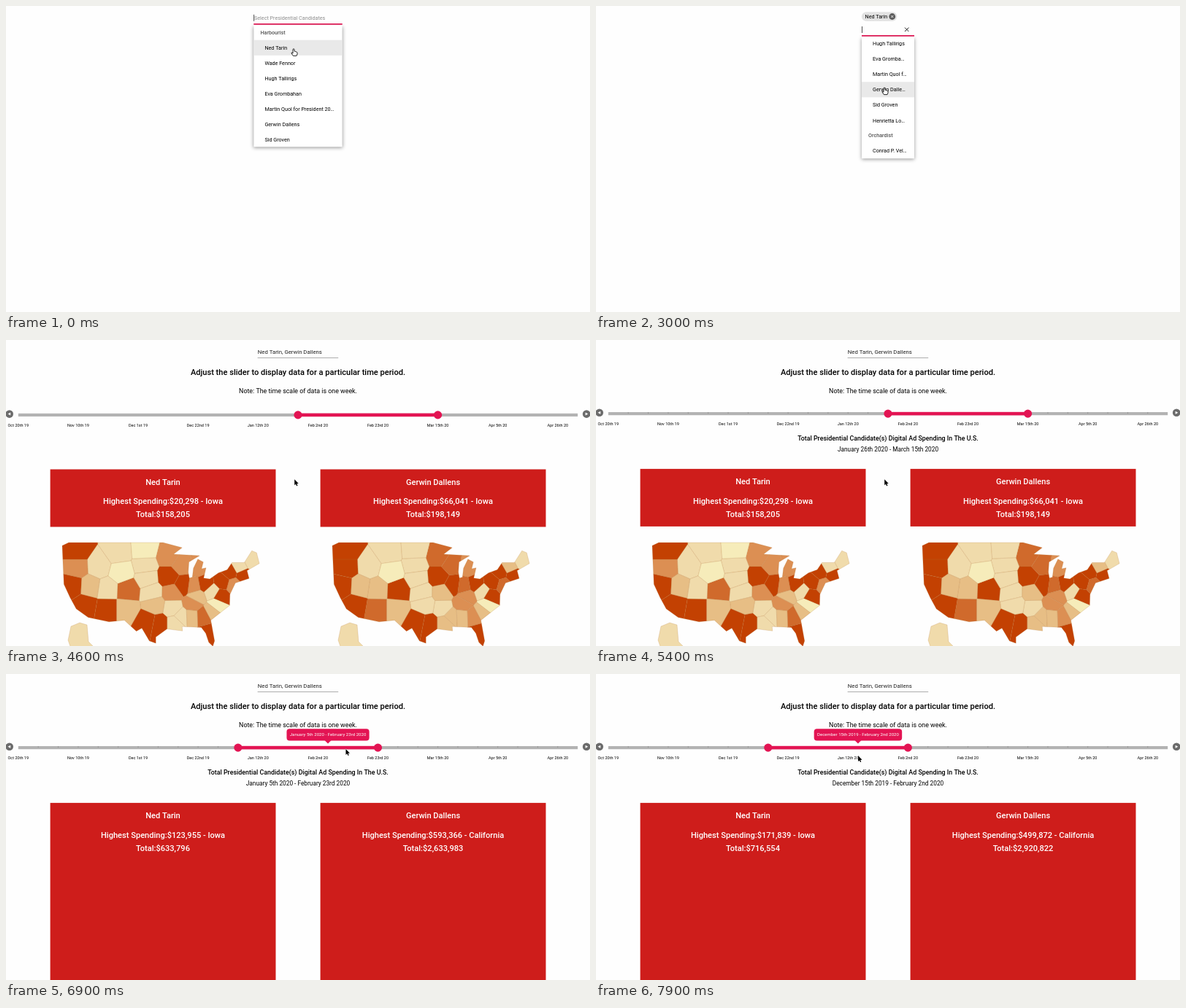
An HTML page with a canvas for the animation above (8 s loop, 800 by 420 pixels).

```html
<!DOCTYPE html>
<html lang="en">
<head>
<meta charset="utf-8">
<title>Campaign ad spending</title>
<style>
html, body { margin: 0; width: 100%; height: 100%; overflow: hidden; background: #fefefe; }
canvas { display: block; width: 800px; height: 420px; }
</style>
</head>
<body>
<canvas id="stage"></canvas>
<script>
const LOOP = 8000, W = 800, H = 420, STEP = 100;
const PINK = '#e31453', RED = '#ce1d1b', PAPER = '#fefefe';
const TINTS = ['#f6ecba', '#f0dbab', '#e7be85', '#dc8f53', '#d06a2c', '#c34102'];
const FIRST = 'Ned Tarin', SECOND = 'Gerwin Dallens';

const canvas = document.getElementById('stage');
const ctx = canvas.getContext('2d');
const dpr = window.devicePixelRatio || 1;
canvas.width = W * dpr;
canvas.height = H * dpr;

// Menu entries; groups start with '#'.
const MENU = ['#Harbourist', FIRST, 'Wade Fennor', 'Hugh Tallirigs', 'Eva Grombahan',
  'Martin Quol for President 2020', SECOND, 'Sid Groven', 'Henrietta Lowmarsh',
  '#Orchardist', 'Conrad P. Velling'];

const clamp = v => Math.max(0, Math.min(1, v));
const ramp = (t, a, b) => clamp((t - a) / (b - a));
const mix = (a, b, u) => a + (b - a) * u;
const ease = u => u * u * (3 - 2 * u);

function along(keys, t) {
  let i = keys.findIndex(k => k[0] > t);
  if (i < 0) return keys[keys.length - 1].slice(1);
  i = Math.max(i, 1);
  const a = keys[i - 1], b = keys[i], u = ramp(t, a[0], b[0]);
  return a.slice(1).map((v, n) => mix(v, b[n + 1], u));
}

const pairs = list => list.flatMap((v, i) => i % 2 ? [] : [[v, list[i + 1]]]);
function poly(points) {
  const p = new Path2D();
  for (const [x, y] of points) p.lineTo(x, y);
  p.closePath();
  return p;
}

// Mercator projection of longitude and latitude
const stretch = lat => Math.log(Math.tan(Math.PI / 4 + lat * Math.PI / 360));
const project = ([lon, lat]) => [77 + (lon + 124.7) * 4.68, 278 + (stretch(49) - stretch(lat)) * 268];

const COAST = [-124.7,48.4, -122.8,49, -95.2,49, -89.6,48, -92.1,46.7, -84.5,46.4, -87.6,45.1,
  -87.8,43, -87.5,41.7, -86.6,41.9, -86.3,43.8, -85,45.7, -83.4,45.1, -83.9,43.7, -82.6,43.9,
  -83.3,41.7, -81.5,41.5, -79,42.8, -76.4,43.5, -75,45, -71.4,45, -69.2,47.4, -67.8,47, -67,44.8,
  -70.6,43.3, -70,41.6, -74,40.6, -75.6,38, -75.7,35.4, -77.9,34, -81.2,31.8, -80.1,26.5,
  -80.6,25.1, -81.8,26.1, -82.7,28.5, -84,30, -89.6,30.2, -89.5,29.1, -94,29.6, -97.3,27.5,
  -97.3,25.9, -99.2,26.5, -101.4,29.8, -103,29, -106.5,31.8, -111,31.4, -117.1,32.5, -120.6,34.6,
  -122.4,37.3, -124.2,40.3];

// State centres, keyed by their tint on the left and the right map.
const CENTRES = {
  55: [-120.5,47.3, -121.7,40, -118,35.5, -99.5,31.5, -96.5,31, -93.5,42, -89.2,40.2, -82.8,40.4,
    -78.3,37.5, -77.8,40.9, -75.5,42.9, -82,28.4, -71.8,42.3],
  45: [-105.5,39], 54: [-111.6,34.6], 35: [-120.5,44], 43: [-83.4,32.8],
  34: [-93.5,46.2, -89.8,44.5, -86.2,39.9, -74.4,40.2],
  33: [-84.8,44, -86.4,35.8], 32: [-92.5,38.4], 23: [-85.3,37.5],
  22: [-116.6,39.8, -106,34.6, -86.8,32.7, -80.9,33.9],
  21: [-97.5,35.5],
  12: [-111.5,39.2, -91.5,31, -89.7,32.6, -72.8,44],
  11: [-114,44.2, -108.3,47, -100.3,44.4, -99.8,41.6, -98.4,38.5, -92.4,34.8, -80.8,38.7, -69.2,45.3],
  '01': [-100.5,47.4], '00': [-107.5,43, -79.3,35.6]
};

// Keeps the part of a shape that lies nearer to a than to b.
function nearer(shape, a, b) {
  const side = p => Math.hypot(p[0] - b[0], p[1] - b[1]) ** 2 - Math.hypot(p[0] - a[0], p[1] - a[1]) ** 2;
  return shape.flatMap((p, i) => {
    const q = shape[(i + 1) % shape.length], sp = side(p), sq = side(q), out = sp >= 0 ? [p] : [];
    if (sp * sq < 0) out.push(p.map((v, n) => mix(v, q[n], sp / (sp - sq))));
    return out;
  });
}

const land = poly(pairs(COAST).map(project));
const alaska = poly(pairs([85,412, 89,393, 101,388, 111,391, 113,414, 124,425, 92,432]));
const sites = Object.entries(CENTRES).flatMap(([tints, list]) =>
  pairs(list).map(p => ({ tints, at: project(p) })));
const frame = [[60, 260], [360, 260], [360, 440], [60, 440]];
for (const s of sites)
  s.path = poly(sites.reduce((shape, o) => o === s ? shape : nearer(shape, s.at, o.at), frame));

function rect(x, y, w, h, fill) {
  ctx.fillStyle = fill;
  ctx.fillRect(x, y, w, h);
}
function pill(x, y, w, h, r, fill) {
  ctx.fillStyle = fill;
  ctx.beginPath();
  ctx.roundRect(x, y, w, h, r);
  ctx.fill();
}
function disc(x, y, r, fill) {
  ctx.fillStyle = fill;
  ctx.beginPath();
  ctx.arc(x, y, r, 0, 7);
  ctx.fill();
}
function cross(x, y, r, color) {
  ctx.strokeStyle = color;
  ctx.lineWidth = 1;
  ctx.beginPath();
  ctx.moveTo(x - r, y - r); ctx.lineTo(x + r, y + r);
  ctx.moveTo(x + r, y - r); ctx.lineTo(x - r, y + r);
  ctx.stroke();
}
const setFont = (size, weight = 400) => { ctx.font = `${weight} ${size}px Roboto, sans-serif`; };

// y is the middle of the capitals
function label(str, x, y, size, color = '#000', weight = 400, align = 'left') {
  setFont(size, weight);
  ctx.fillStyle = color;
  ctx.textAlign = align;
  ctx.fillText(str, x, y + size * 0.355);
}
const centred = (str, x, y, size, color, weight) => label(str, x, y, size, color, weight, 'center');

function shorten(str, max) {
  if (ctx.measureText(str).width <= max) return str;
  while (ctx.measureText(str + '…').width > max) str = str.slice(0, -1);
  return str.trimEnd() + '…';
}

function chip(x, name) {
  setFont(7.2);
  const w = ctx.measureText(name).width + 17.5;
  pill(x, 8.3, w, 12.4, 6.2, '#e2e2e2');
  label(name, x + 4.5, 14.6, 7.2);
  disc(x + w - 6.5, 14.5, 4.4, '#5c5c5c');
  cross(x + w - 6.5, 14.5, 1.6, '#e8e8e8');
  return x + w + 3.5;
}

function caret(x, y, t) {
  if ((t + 400) % 1000 < 500) rect(x, y, 0.8, 9, '#222');
}

function menu(x, y, w, scroll, hover, thumb) {
  const h = 167.3;
  ctx.save();
  ctx.shadowColor = 'rgba(0,0,0,.42)';
  ctx.shadowBlur = 5 * dpr;
  ctx.shadowOffsetY = 2 * dpr;
  rect(x, y, w, h, '#fff');
  ctx.restore();
  ctx.save();
  ctx.beginPath();
  ctx.rect(x, y, w, h);
  ctx.clip();
  let top = y - scroll;
  for (const item of MENU) {
    const group = item[0] === '#', rowH = group ? 20.7 : 21.1, mid = top + rowH / 2;
    if (item === hover) rect(x, top, w, rowH, '#e9e9e9');
    if (group) label(item.slice(1), x + 9, mid, 7.2, '#555', 500);
    else {
      setFont(7.2);
      label(shorten(item, w - 25), x + 15, mid, 7.2);
    }
    top += rowH;
  }
  ctx.globalAlpha = thumb;
  pill(x + w - 5.2, y + 2.5 + scroll * 0.48, 3.8, 124, 1.9, '#747474');
  ctx.restore();
}

function openField(t) {
  if (t < 200) {
    label('Select Presidential Candidates', 340, 16, 7.2, '#8d8d8d');
    caret(339.3, 11.8, t);
    rect(339.3, 24, 121.4, 1.7, PINK);
    menu(339.4, 26, 121.2, 0, FIRST, 0);
    return;
  }
  const two = t >= 3100, x = two ? 328 : 364, w = two ? 144 : 72;
  const next = chip(x, FIRST);
  if (two) chip(next, SECOND);
  caret(x + 0.2, 28, t);
  cross(x + w - 10.3, 32.3, 2.7, '#222');
  rect(x, 40, w, 1.7, PINK);
  if (t < 700 || two) return;
  const scroll = 50 * ease(ramp(t, 900, 1300)) + 14 * ramp(t, 1400, 1700);
  const hover = t < 1100 ? '' : t < 1900 ? SECOND : t < 2100 ? MENU[8] : t < 2400 ? MENU[7] : SECOND;
  menu(364, 42, 72, scroll, hover, ramp(t, 800, 1000) * (1 - ramp(t, 2100, 2400)));
}

const weekX = n => 16.8 + n * 27.37;

function dayOf(week) {
  const d = new Date(Date.UTC(2019, 9, 20 + week * 7)), n = d.getUTCDate();
  const end = n > 10 && n < 14 ? 'th' : ['th', 'st', 'nd', 'rd'][n % 10] || 'th';
  const month = d.toLocaleString('en-US', { month: 'long', timeZone: 'UTC' });
  return { month, day: n + end, year: d.getUTCFullYear() };
}
const longDate = week => { const d = dayOf(week); return `${d.month} ${d.day} ${d.year}`; };
const span = week => `${longDate(week)} - ${longDate(week + 7)}`;

// The range is dragged back one week at a time, easing out.
const weekAt = t => 14 - Math.ceil(4 * ramp(t, 6500, 7200)) - Math.floor(2 * ramp(t, 7200, 7800));

function slider(y, week, ticks) {
  rect(16.8, y - 2.1, 766.4, 4.2, '#b3b3b3');
  if (ticks) for (let i = 1; i < 28; i++) rect(weekX(i) - 0.5, y - 1.6, 1, 1.2, '#858585');
  for (let i = 0; i < 28; i += 3) {
    const d = dayOf(i);
    centred(`${d.month.slice(0, 3)} ${d.day} ${d.year % 100}`, weekX(i), y + 14.4, 5.54);
  }
  const a = weekX(week), b = weekX(week + 7);
  rect(a, y - 2.3, b - a, 4.6, PINK);
  disc(a, y, 5.6, PINK);
  disc(b, y, 5.6, PINK);
  for (const [x, dir] of [[4.7, -1], [795.2, 1]]) {
    disc(x, y - 1.3, 5.3, '#6b6b6b');
    ctx.fillStyle = '#fff';
    ctx.fill(poly([[x + dir * 2.2, y - 1.3], [x - dir * 1.5, y - 3.3], [x - dir * 1.5, y + 0.7]]));
  }
}

// The bubble trails behind the range it names.
function bubble(at, shown) {
  const x = weekX(at + 3.5), str = span(shown);
  setFont(6.1);
  const w = ctx.measureText(str).width + 8.5;
  pill(x - w / 2, 75.2, w, 16.2, 4, PINK);
  ctx.fill(poly([[x - 4.5, 91], [x + 4.5, 91], [x, 95.5]]));
  centred(str, x, 83.2, 6.1, '#fff');
}

function drawMap(side) {
  ctx.save();
  ctx.translate(side * 370, 0);
  ctx.lineJoin = 'round';
  ctx.lineWidth = 0.45;
  ctx.strokeStyle = 'rgba(176,112,44,.45)';
  ctx.save();
  ctx.clip(land);
  for (const s of sites) {
    ctx.fillStyle = TINTS[s.tints[side]];
    ctx.fill(s.path);
    ctx.stroke(s.path);
  }
  ctx.restore();
  ctx.stroke(land);
  ctx.fillStyle = TINTS[1];
  ctx.fill(alaska);
  ctx.stroke(alaska);
  for (let i = 0; i < 4; i++) disc(142 + i * 7, 422 + i * 3.5, 1.6 + i * 0.4, TINTS[2]);
  TINTS.forEach((c, i) => rect(66 + i * 12, 436, 12, 7, c));
  label('Spending', 142, 440, 8, '#555');
  ctx.restore();
}

const money = v => '$' + Math.round(v).toLocaleString('en-US');

// week, highest state, total
const SPENT = [
  { name: FIRST, keys: [[8, 171839, 716554], [10, 158507, 792326], [14, 20298, 158205]] },
  { name: SECOND, keys: [[8, 499872, 2920822], [10, 769141, 3445927], [14, 66041, 198149]] }];

function card(side, week, shift, grow) {
  const { name, keys } = SPENT[side], mid = 215 + side * 370, tall = week < 14;
  const [top, sum] = along(keys, week);
  const state = side && week < 13 ? 'California' : 'Iowa';
  const scale = 1 - Math.pow(1 - grow, 1.2);
  if (scale <= 0) return;
  ctx.save();
  ctx.globalAlpha = 1 - (1 - grow) ** 2;
  ctx.translate(mid, 207.5);
  ctx.scale(scale, scale);
  ctx.translate(-mid, -207.5);
  rect(mid - 154.4, 176.9 + shift, 308.9, tall ? 300 : 79, RED);
  const line = (str, dy) => centred(str, mid, 194.3 + shift + dy, 11.08, '#fff', 500);
  line(name, 0);
  line(`Highest Spending:${money(top)} - ${state}`, 26.4);
  line(`Total:${money(sum)}`, 44.3);
  if (!tall) drawMap(side);
  ctx.restore();
}

function results(t) {
  label(`${FIRST}, ${SECOND}`, 344.8, 15.8, 7.75, '#222');
  rect(344.6, 24.2, 110.6, 0.7, '#8c8c8c');
  const week = weekAt(t), settle = ease(ramp(t, 4700, 5000));
  ctx.globalAlpha = ramp(t, 3700, 4000);
  centred('Adjust the slider to display data for a particular time period.', 400, 44.3, 11.08, '#000', 500);
  centred('Note: The time scale of data is one week.', 400, 69.8, 8.87);
  slider(mix(51.8, 102.9, ease(ramp(t, 4100, 4500))) - 1.8 * settle, week, t >= 4700);
  ctx.globalAlpha = ramp(t, 4700, 5400);
  centred('Total Presidential Candidate(s) Digital Ad Spending In The U.S.', 400, 134.7, 8.87, '#000', 500);
  centred(span(week), 400, 149.8, 8.31);
  ctx.globalAlpha = 1;
  for (const side of [0, 1]) card(side, week, 0.6 * (1 - settle), ramp(t, 4000, 4500));
  if (t >= 6300) bubble(weekAt(t - 200), week);
}

const PATH = [[600, 394, 58.8], [800, 394, 34], [1300, 395, 148.8], [1900, 395, 148.8],
  [2500, 395, 112], [3000, 395, 112], [3400, 395.2, 191.3], [5600, 395.2, 191.3],
  [6000, 468, 52], [6500, 499, 99.5], [7200, 440.3, 105.5], [7900, 359, 112]];
const ARROW = new Path2D('M0 0V8L1.8 6.4 3 9.1 4.3 8.5 3.1 5.9 5.5 5.8Z');
const HAND = new Path2D('M-1 .6Q0-.7 1 .6V3.4Q2 2.8 2.4 3.8Q3.6 3.3 3.8 4.5Q5 4.2 5 5.5V7.2L4 9.6H-.6L-3 6Q-3.3 4.9-2 5.3L-1 6.2Z');
const FIST = new Path2D('M-3 2Q-2.6 .4-1.4 1.2Q-.5 0 .4 1.1Q1.6 .4 2.1 1.6Q3.5 1.3 3.5 2.8L2.7 6.2H-2L-3.4 4Z');

function pointer(t) {
  const grab = t >= 6300 && t < 6700, hand = t < 3100;
  ctx.save();
  ctx.translate(...along(PATH, t));
  ctx.lineJoin = 'round';
  ctx.lineWidth = 1;
  if (hand || grab) {
    const shape = grab ? FIST : HAND;
    ctx.fillStyle = '#fff';
    ctx.strokeStyle = '#222';
    ctx.fill(shape);
    ctx.stroke(shape);
  } else {
    ctx.fillStyle = '#000';
    ctx.strokeStyle = '#fff';
    ctx.stroke(ARROW);
    ctx.fill(ARROW);
  }
  ctx.restore();
}

function draw(time) {
  const t = Math.floor((time % LOOP) / STEP) * STEP;
  ctx.setTransform(dpr, 0, 0, dpr, 0, 0);
  ctx.globalAlpha = 1;
  rect(0, 0, W, H, PAPER);
  if (t < 3800) openField(t);
  else results(t);
  pointer(t);
}

let start;
function tick(now) {
  start ??= now;
  draw(now - start);
  requestAnimationFrame(tick);
}
requestAnimationFrame(tick);
</script>
</body>
</html>
```
